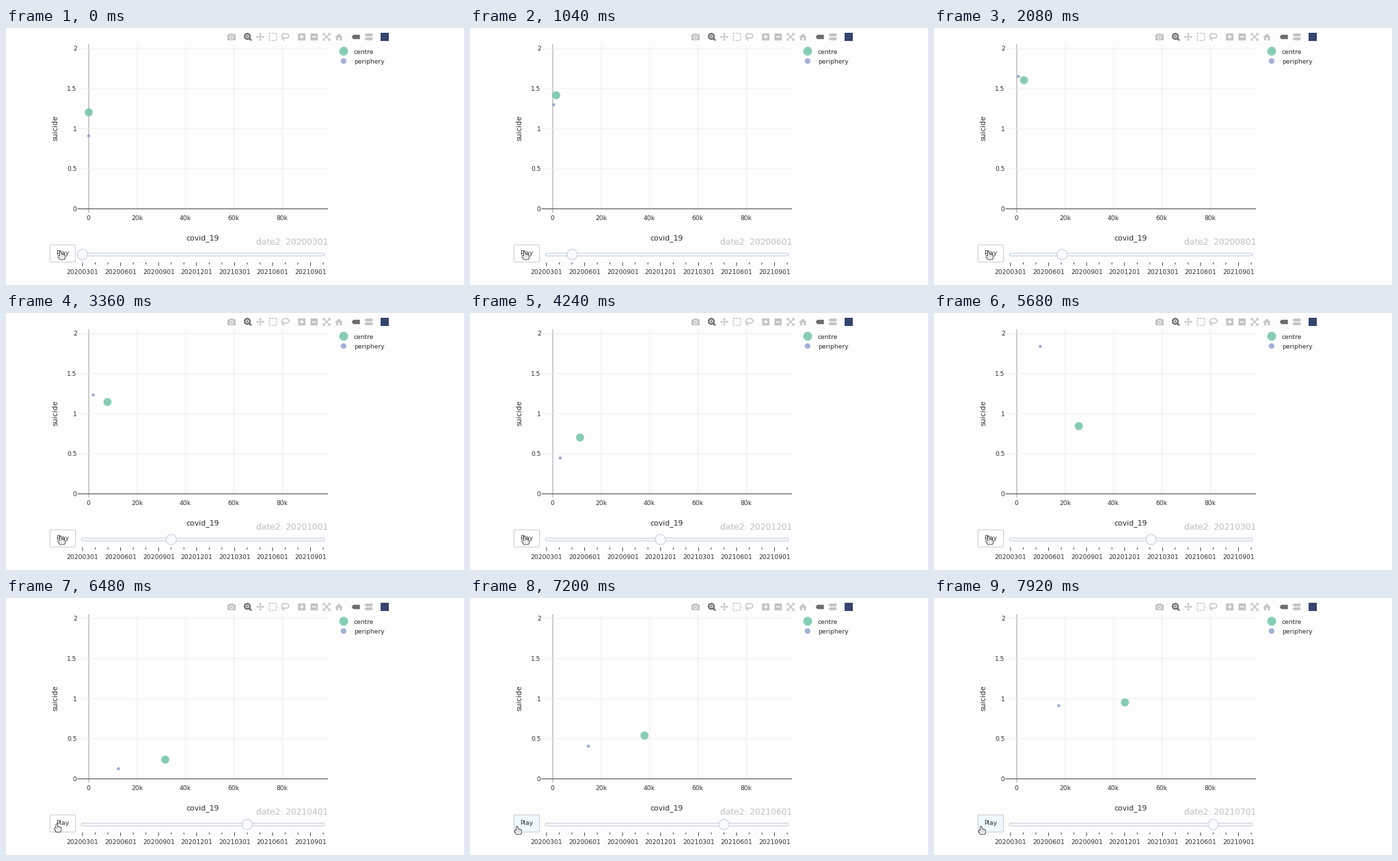
Write a matplotlib script that moves like this. It is 670x376 px and loops after 8000 ms.

```python
import math

import numpy as np
import matplotlib.pyplot as plt
from matplotlib.animation import FuncAnimation
from matplotlib.patches import Circle, Ellipse, FancyBboxPatch, Polygon, Rectangle
from matplotlib.transforms import Affine2D

W, H = 670, 376
FRAMES, INTERVAL = 100, 80
PT = 0.72  # points per pixel at 100 dpi

BG, INK, DARK = "#fdfdfd", "#2e2e2e", "#444444"
GRID, BORDER, RAIL = "#ebebeb", "#bec8d9", "#f8fafc"
IDLE, ACTIVE = "#c3c3c3", "#6c6c6c"
TEAL, VIOLET = "#64bfa2", "#8da0cb"

plt.rcParams["font.family"] = "DejaVu Sans"
fig = plt.figure(figsize=(W / 100, H / 100), dpi=100, facecolor=BG)
ax = fig.add_axes([0, 0, 1, 1])
ax.set_xlim(0, W)
ax.set_ylim(H, 0)
ax.axis("off")


def line(xs, ys, color=INK, width=0.8, z=1, **kw):
    ax.plot(xs, ys, color=color, lw=width * PT, zorder=z, snap=False,
            solid_capstyle="butt", **kw)


def text(x, y, label, size=9.1, ha="center", color=INK, va="baseline", **kw):
    return ax.text(x, y, label, fontsize=size * PT, ha=ha, va=va, color=color,
                   zorder=6, **kw)


def add(patch, fill, edge="none", width=0.0, z=3, alpha=None):
    patch.set(facecolor=fill, edgecolor=edge, linewidth=width * PT,
              zorder=z, alpha=alpha, snap=False)
    return ax.add_patch(patch)


def disc(x, y, r, fill, **kw):
    return add(Circle((x, y), r), fill, **kw)


def box(x, y, w, h, fill, **kw):
    return add(Rectangle((x, y), w, h), fill, **kw)


def rounded(x, y, w, h, r, fill, **kw):
    style = f"round,pad=0,rounding_size={r}"
    return add(FancyBboxPatch((x, y), w, h, boxstyle=style), fill, **kw)


def poly(points, fill, **kw):
    return add(Polygon(points, closed=True), fill, **kw)


def px(thousands):
    return 121 + 3.544 * thousands


def py(rate):
    return 264.6 - 117.25 * rate


def draw_axes():
    for thousands in range(0, 100, 20):
        x = px(thousands)
        text(x - 0.3, 281.2, f"{thousands}k" if thousands else "0")
        line([x, x], [24, 270], GRID if thousands else "#868686")
    for rate in np.arange(0, 2.5, 0.5):
        y = py(rate)
        text(103.7, y + 3.2, f"{rate:g}", ha="right")
        line([106 if rate else 104.5, 471], [y, y], GRID if rate else DARK,
             0.8 if rate else 1)
    text(288, 310.2, "covid_19", 10.9)
    text(72.3, 146.2, "suicide", 10.6, rotation=90, va="center")


def draw_legend():
    disc(494, 34, 6.5, TEAL, alpha=0.78)
    disc(493.8, 48.3, 4.1, VIOLET, alpha=0.82)
    text(508.8, 37.7, "centre", ha="left")
    text(508.8, 51.9, "periphery", ha="left")


def draw_tag(x, y, h, color):
    poly([(x - 6, y), (x - 3.5, y - h), (x + 6, y - h), (x + 6, y + h), (x - 3.5, y + h)],
         color)


def draw_toolbar():
    # camera
    rounded(324, 9.3, 12, 8.7, 1, IDLE)
    box(327.5, 8, 5, 2, IDLE)
    disc(330, 13.7, 2.9, BG)
    disc(330, 13.7, 1.8, IDLE)
    # zoom
    disc(353, 12.2, 3.9, "none", edge=ACTIVE, width=2.3)
    line([355.8, 359], [15, 18.3], ACTIVE, 2.5)
    line([351, 355], [12.2, 12.2], ACTIVE, 1.1)
    line([353, 353], [10.2, 14.2], ACTIVE, 1.1)
    # pan
    for dx, dy in ((1, 0), (-1, 0), (0, 1), (0, -1)):
        tip, back = np.array([372 + 6 * dx, 13 + 6 * dy]), 2.4 * np.array([dx, dy])
        side = back[::-1]
        poly([tip, tip - back + side, tip - back - side], IDLE)
        line([372, tip[0] - dx], [13, tip[1] - dy], IDLE, 1.4)
    # box select and lasso
    add(Rectangle((385, 7.7), 10.8, 10.6, linestyle=(0, (1.5, 1))), "none",
        edge=IDLE, width=1.5)
    add(Ellipse((408.7, 11.5), 10.4, 7), "none", edge=IDLE, width=1.5)
    line([404.5, 404, 405.5, 407], [14, 16, 16.3, 18.5], IDLE, 1.4)
    # zoom in and out
    for x in (432.6, 450.7):
        rounded(x - 5.4, 7.9, 10.8, 10.3, 1, IDLE)
        line([x - 3, x + 3], [13, 13], BG, 1.6, 4)
    line([432.6, 432.6], [10, 16], BG, 1.6, 4)
    # autoscale
    for sx in (-1, 1):
        line([469 - 4 * sx, 469 + 4 * sx], [9, 17], IDLE, 1.5)
        for sy in (-1, 1):
            x, y = 469 + 5.7 * sx, 13 + 5.7 * sy
            poly([(x, y), (x - 4 * sx, y), (x, y - 4 * sy)], IDLE)
    # home
    poly([(481.2, 13.8), (487, 8.2), (492.8, 13.8)], IDLE)
    for x in (482.8, 488.2):
        box(x, 13.2, 3, 4.8, IDLE)
    # hover modes
    draw_tag(511.7, 13.1, 3.2, ACTIVE)
    draw_tag(530.2, 10.2, 2.1, IDLE)
    draw_tag(530.2, 15.8, 2.1, IDLE)
    box(548, 7, 12, 12, "#35456f")


def month_label(k):
    year, month = divmod(k + 2, 12)
    return f"{2020 + year}{month + 1:02d}01"


def slider_x(k):
    return 112 + 18.53 * k


def draw_slider():
    rounded(110.2, 329.3, 355.8, 4.2, 2, RAIL, edge=BORDER, width=0.9)
    for k in range(20):
        x, major = slider_x(k), k % 3 == 0
        line([x, x], [343, 348.3 if major else 346], "#333333", 0.9)
        if major:
            text(x, 360.3, month_label(k))


def draw_hand(transform):
    """Pointing hand around the origin: dark shapes with smaller white ones on top."""
    def part(x, y, w, h, grow, color, z):
        shape = rounded(x - grow, y - grow, w + 2 * grow, h + 2 * grow, 0.9 + grow, color, z=z)
        shape.set_transform(transform + ax.transData)

    for grow, color, z in ((0.8, "#222222", 8), (0, "white", 9)):
        part(-2.3, -5.5, 1.8, 9, grow, color, z)
        for i in range(3):
            part(-0.3 + 1.7 * i, -1.9 + 0.6 * i, 1.8, 5, grow, color, z)
        part(-4.6, -0.2, 2, 3, grow, color, z)
        part(-2.9, 1.5, 7, 4, grow, color, z)
    for i in range(3):
        part(-0.4 + 1.8 * i, 1.2, 0.1, 2.6, -0.1, "#555555", 10)


# Key points: month, centre cases in thousands, centre rate, periphery rate
KEYS = np.array([
    (0, 0, 1.205, 0.91),
    (4, 2.85, 1.62, 1.665),
    (7, 8.56, 1.07, 1.165),
    (9, 12.8, 0.5, 0.05),
    (11, 25.3, 0.9, 1.98),
    (12, 29.1, 0.25, 0.3),
    (13, 32.9, 0.235, 0.035),
    (16, 47.3, 1.115, 1.11),
]).T


def positions(month):
    """Pixel centres of both bubbles."""
    cases, rate, outer_rate = (np.interp(month, KEYS[0], row) for row in KEYS[1:])
    share = 0.238 + 0.151 / (1 + math.exp(-1.37 * (month - 9.14)))
    return (px(cases), py(rate)), (px(cases * share), py(outer_rate))


def month_start(k):
    return max(20, 2040 + 514 * (k - 5)) if k else 0


def cubic_in_out(u):
    return 4 * u ** 3 if u < 0.5 else 1 - 4 * (1 - u) ** 3


draw_axes()
draw_legend()
draw_toolbar()
draw_slider()

button = rounded(64.3, 317.3, 37.3, 25, 1.5, "white", edge="#c2c6ce", width=0.9)
text(82.5, 332.2, "Play")
date = text(471, 317.4, "", 12.2, ha="right", color="#c0c0c0")
knob = disc(112, 331.4, 7.6, RAIL, edge=BORDER, width=0.9, z=5)
centre = disc(0, 0, 5.9, TEAL, z=4, alpha=0.78)
periphery = disc(0, 0, 2.2, VIOLET, z=4, alpha=0.9)
hand_place = Affine2D()
draw_hand(hand_place)


def update(frame):
    t = frame * INTERVAL
    k = max(i for i in range(20) if month_start(i) <= t)
    elapsed = t - month_start(k)
    previous = max(k - 1, 0)
    step = k - previous

    centre.center, periphery.center = positions(previous + step * min(1, elapsed / 500))
    knob.center = slider_x(previous + step * cubic_in_out(min(1, elapsed / 150))), 331.4
    date.set_text(f"date2: {month_label(k)}")

    moved = np.clip((t - 6160) / 640, 0, 1)
    hand_place.clear().translate(81.2 - 11 * moved, 333 + 7 * moved)
    button.set_facecolor("#f0f8ff" if t >= 6560 else "white")
    return centre, periphery, knob, date, button


anim = FuncAnimation(fig, update, frames=FRAMES, interval=INTERVAL,
                     init_func=lambda: update(0), repeat=True, repeat_delay=0)
plt.show()
```
